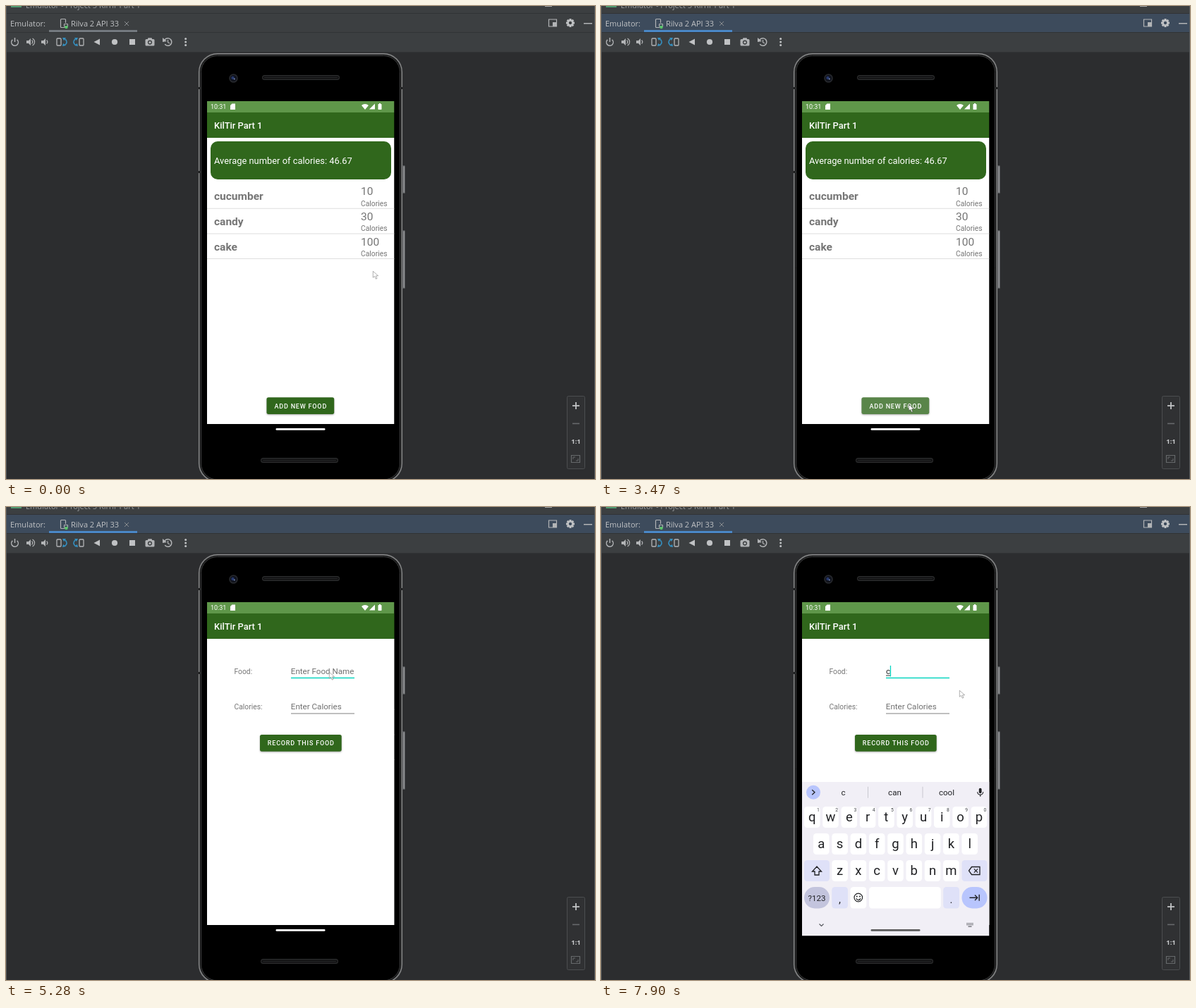
These frames come from a looping animation (835 px wide and 671 px high, 8 s). An HTML page with a canvas:

```html
<!DOCTYPE html>
<html lang="en">
<head>
<meta charset="utf-8">
<title>Calorie tracker demo</title>
<style>
html, body { margin: 0; width: 100%; height: 100%; overflow: hidden; background: #2c2d2f; }
canvas { display: block; width: 835px; height: 671px; }
</style>
</head>
<body>
<canvas id="stage" width="835" height="671"></canvas>
<script>
const W = 835, H = 671, LOOP = 8000;
const stage = document.getElementById('stage').getContext('2d');
const layer = document.createElement('canvas');
layer.width = W; layer.height = H;
const layerCtx = layer.getContext('2d');
let c = stage;

const GREEN = '#30671c', TEAL = '#08d5c0', GREY = '#757575', ICON = '#b2b4b6', INK = '#202124';
const UI = '"Open Sans", sans-serif', APP = 'Roboto, sans-serif';
const APP_NAME = 'KilTir Part 1';

function box(x, y, w, h, r, fill) {
  c.beginPath(); c.roundRect(x, y, w, h, r);
  c.fillStyle = fill; c.fill();
}
function frame(x, y, w, h, r, color, lw = 1) {
  c.beginPath(); c.roundRect(x, y, w, h, r);
  c.strokeStyle = color; c.lineWidth = lw; c.stroke();
}
function disc(x, y, r, fill) {
  c.beginPath(); c.arc(x, y, r, 0, 7); c.fillStyle = fill; c.fill();
}
function arc(x, y, r, a, b, color, lw) {
  c.beginPath(); c.arc(x, y, r, a, b); c.strokeStyle = color; c.lineWidth = lw; c.stroke();
}
function trace(x, y, pts) {
  c.beginPath();
  for (let i = 0; i < pts.length; i += 2) c.lineTo(x + pts[i], y + pts[i + 1]);
}
function line(x, y, pts, color, lw = 1) {
  trace(x, y, pts); c.strokeStyle = color; c.lineWidth = lw; c.stroke();
}
function poly(x, y, pts, fill) {
  trace(x, y, pts); c.closePath(); c.fillStyle = fill; c.fill();
}
function text(s, x, y, size, color, { weight = 400, font = APP, align = 'left', gap = 0 } = {}) {
  c.font = `${weight} ${size}px ${font}`;
  c.textAlign = align; c.letterSpacing = gap + 'px';
  c.fillStyle = color; c.fillText(s, x, y);
}
function gear(x, y, r, color, hole) {
  for (let i = 0; i < 8; i++) {
    c.save(); c.translate(x, y); c.rotate(i * Math.PI / 4);
    box(-r * .25, -r, r * .5, r, 0, color); c.restore();
  }
  disc(x, y, r * .76, color);
  disc(x, y, r * .36, hole);
}
// Number of steps already taken at time t, out of n evenly spread over [from, to].
function stepsDone(t, from, to, n) {
  return t < from ? 0 : Math.min(n, 1 + Math.floor((t - from) * (n - 1) / (to - from) + 1e-6));
}
const mix = (a, b, p) => a + (b - a) * p;
const easeOut = p => 1 - (1 - p) ** 2;
const smooth = p => p * p * (3 - 2 * p);

function ide(t) {
  c.fillStyle = '#2c2d2f'; c.fillRect(0, 0, W, H);
  c.fillStyle = '#3c3f41'; c.fillRect(0, 0, W, 65);
  const bar = t < 2650 ? '#3c3f41' : '#3d4b5c';
  c.fillStyle = bar; c.fillRect(1, 11, 833, 26);
  c.fillStyle = '#313335';
  c.fillRect(0, 10, W, 1); c.fillRect(0, 37, W, 1); c.fillRect(0, 65, W, 1);

  // Lower edge of the window title
  c.fillStyle = '#4f9a70'; c.fillRect(7, 0, 15, 2);
  text('Emulator - Project 5 KilTir Part 1', 28, 2.5, 11, '#999c9e', { font: UI });
  c.fillStyle = '#aaa'; c.fillRect(764, 0, 10, 1);

  text('Emulator:', 6, 29, 11, '#c0c2c4', { font: UI });
  frame(77.5, 18.5, 7, 12, 1, ICON, 1.2);
  box(81, 24, 7, 6, 0, bar);
  frame(82.5, 25.5, 5, 3.5, 0, ICON);
  disc(85.5, 30, 2.3, '#59c36a');
  text('Rilva 2 API 33', 92, 29, 11, '#c0c2c4', { font: UI });
  line(171, 25, [-3, -3, 3, 3], '#898d90');
  line(171, 25, [3, -3, -3, 3], '#898d90');
  box(61, 34, 125, 3, 0, t < 2650 ? '#747a80' : '#4a88c7');

  frame(769.5, 19, 11, 10, 0, ICON, 1.2);
  box(775, 23, 5, 6, 0, ICON);
  gear(800, 24, 6, '#c0c2c4', bar);
  box(819, 24, 12, 1.5, 0, ICON);
  toolbar();
  zoomPanel();
  c.fillStyle = '#56595b';
  c.fillRect(0, 0, 1, H); c.fillRect(834, 0, 1, H);
}

function toolbar() {
  const y = 51;
  arc(12.5, y + .5, 4.8, -.85, Math.PI + .85, ICON, 1.5);
  line(12.5, y, [0, -6, 0, 0], ICON, 1.5);
  for (const x of [34, 55]) {
    poly(x, y, [-5, -2, -2, -2, 1, -5, 1, 5, -2, 2, -5, 2], ICON);
    arc(x + 1, y, 2.8, -1, 1, ICON, 1.3);
  }
  arc(35, y, 5.6, -1.1, 1.1, ICON, 1.3);
  for (const s of [-1, 1]) {
    const x = s < 0 ? 75 : 107;
    frame(x - 3, y - 5, 6, 10, 1, ICON, 1.3);
    c.save(); c.translate(x - s * 8, y); c.scale(-s, 1);
    arc(-1.5, 0, 4.5, -1.1, 1.1, '#3592c4', 1.5);
    poly(0, 0, [-3, -6, 2, -6, -1, -2], '#3592c4');
    poly(0, 0, [-3, 6, 2, 5, -2, 2], '#3592c4');
    c.restore();
  }
  poly(129, y, [-4.5, 0, 4, -4.5, 4, 4.5], '#c0c2c4');
  disc(154, y, 4.1, '#c0c2c4');
  box(175, 47, 8, 8, 0, '#c0c2c4');
  box(197.5, 47, 13, 9.5, 1.5, ICON);
  box(201, 45.2, 6, 3, 1, ICON);
  disc(204, 51.6, 3.1, '#3c3f41'); disc(204, 51.6, 1.7, ICON);
  arc(229.5, y, 5.3, -2.9, 2.5, ICON, 1.5);
  poly(224, 49, [-2, -4, -2, 2, 4, 1], ICON);
  line(229.5, y, [0, -3, 0, .5, 2.5, 2], ICON, 1.2);
  for (const d of [-4.6, 0, 4.6]) disc(254.7, y + d, 1.5, '#c0c2c4');
}

function zoomPanel() {
  box(795, 553, 25, 104, 2, '#303133');
  frame(795.5, 553.5, 25, 103, 2, '#4c4e50');
  box(803, 566.2, 10, 1.8, 0, '#c0c2c4');
  box(807.1, 562, 1.8, 10, 0, '#c0c2c4');
  box(803, 591.6, 10, 1.6, 0, '#66696b');
  text('1:1', 808, 621, 9.5, '#c8cacc', { weight: 700, font: UI, align: 'center' });
  frame(801.5, 637.5, 12, 10, 0, '#66696b', 1.2);
  line(804, 640, [0, 3, 0, 0, 3, 0], '#66696b');
  line(811, 645, [0, -3, 0, 0, -3, 0], '#66696b');
}

function phone() {
  for (const [y, h] of [[226, 40], [318, 83]]) {
    box(561, y, 5, h, 1.5, '#55575a');
    box(563, y + 1, 2, h - 2, 1, '#8e9092');
  }
  box(272.5, 66.5, 290, 609.5, 27, '#3a3b3c');
  frame(273.7, 67.7, 287.6, 607, 26, '#858687', 1.4);
  box(275, 69, 285, 604.5, 25, '#0c0c0c');
  frame(276.5, 70.5, 282, 601.5, 23, '#3c3d3e');
  box(277.5, 71.5, 280, 599.5, 22, '#000');
  for (const y of [115, 234]) box(272.5, y, 3.5, 3, 0, '#202122');
  box(559, 115, 3.5, 3, 0, '#202122');
  disc(322.5, 102.5, 6.3, '#26282c');
  disc(322.5, 102.5, 4.6, '#10131d');
  disc(321.5, 102, 2.2, '#26386b');
  disc(323.8, 103.5, 1, '#8090b8');
  for (const [x, y] of [[363, 98], [361, 641]]) {
    box(x, y, 110, 7, 3.5, '#2d2e2f');
    box(x + 1, y + 1.3, 108, 4.5, 2.2, '#121213');
    box(x + 3, y + 3, 104, 1, .5, '#242526');
  }
  box(382.5, 599, 70, 2.8, 1.4, '#fff');
}

function button(x, y, w, label) {
  c.save();
  c.shadowColor = 'rgba(0,0,0,.35)'; c.shadowBlur = 2.5; c.shadowOffsetY = 1;
  box(x, y, w, 23.7, 2.6, GREEN);
  c.restore();
  text(label, x + w / 2 + .4, y + 15.3, 9.03, '#fff', { weight: 500, align: 'center', gap: .806 });
}

function pageBase(dx) {
  box(285, 187, 265.5, 406, 0, '#fff');
  box(285, 151, 265.5, 36, 0, GREEN);
  text(APP_NAME, 295 + dx, 173.6, 12.9, '#fff', { weight: 500 });
}

function listPage(dx, t) {
  pageBase(dx);
  box(290 + dx, 192, 256, 54, 10, GREEN);
  text('Average number of calories: 46.67', 295 + dx, 224, 12.9, '#fff');
  [['cucumber', 10], ['candy', 30], ['cake', 100]].forEach(([name, n], i) => {
    const y = i * 35.7;
    text(name, 295 + dx, 275.3 + y, 15.5, GREY, { weight: 700 });
    text(String(n), 503 + dx, 268.4 + y, 15.5, GREY);
    text('Calories', 503 + dx, 283.5 + y, 10.3, GREY);
    box(285, 286.7 + y, 265.5, 1, 0, '#dedede');
  });
  button(369.5 + dx, 555.2, 95.7, 'ADD NEW FOOD');
  const ripple = stepsDone(t, 3080, 3340, 3);
  if (ripple && t < 3590) {
    c.save();
    c.beginPath(); c.roundRect(369.5, 555.2, 95.7, 23.7, 2.6); c.clip();
    disc(436, 567, ripple * 28, 'rgba(255,255,255,.2)');
    c.restore();
  }
}

function formPage(dx, t) {
  pageBase(dx);
  const focus = t >= 5280, typed = t >= 7620;
  text('Food:', 323.5 + dx, 236.8, 10.3, GREY);
  text('Calories:', 323.5 + dx, 287, 10.3, GREY);
  if (typed) {
    text('c', 404 + dx, 237.2, 11.6, '#222');
    box(404, 238.6, 6, 1, 0, '#333');
  } else text('Enter Food Name', 403.8 + dx, 237.2, 11.6, '#707070');
  text('Enter Calories', 403.8 + dx, 287.4, 11.6, '#707070');
  box(404 + dx, focus ? 241.7 : 242.2, 90, focus ? 1.6 : 1, 0, focus ? TEAL : '#808080');
  box(404 + dx, 292.4, 90, 1, 0, '#808080');
  const caret = (t >= 5400 && t < 5860) || (t >= 6270 && t < 6810) || t >= 7480;
  if (caret) box(typed ? 409.8 : 404, 225, 1.3, 15.5, 0, TEAL);
  button(360 + dx, 323, 115.7, 'RECORD THIS FOOD');
}

function statusBar() {
  box(285, 135, 265.5, 16, 0, '#5f974a');
  text('10:31', 290, 146.2, 9, '#fff');
  poly(318, 138.5, [2.5, 0, 7, 0, 7, 8.5, 0, 8.5, 0, 2.5], '#fff');
  c.beginPath(); c.moveTo(509, 147); c.arc(509, 146, 7, -2.36, -.78); c.closePath();
  c.fillStyle = '#fff'; c.fill();
  poly(515, 138.5, [8, 0, 8, 8, 0, 8], '#fff');
  box(527.5, 139, 5, 8, .8, '#fff');
  box(529, 138, 2, 2, 0, '#fff');
}

function mic(x, y) {
  box(x - 1.9, y - 6, 3.8, 7.5, 1.9, INK);
  arc(x, y - .5, 4, 0, Math.PI, INK, 1.2);
  line(x, y, [0, 3.5, 0, 6], INK, 1.2);
}

function toolStrip(y) {
  line(301, y, [2, -3.5, -1.8, 0, 2, 3.5], INK, 1.3);
  frame(331.5, y - 5, 9.5, 10, 1.5, INK, 1.3);
  poly(338, y + 2, [0, 4, 0, 0, 4, 0], INK);
  disc(334.5, y - 1.5, .8, INK); disc(338.2, y - 1.5, .8, INK);
  arc(336.3, y, 2.4, .3, 2.8, INK, 1);
  text('GIF', 374.5, y + 3.4, 9, INK, { weight: 900, align: 'center', gap: .3 });
  frame(408.5, y - 4.5, 9, 10, 1, INK, 1.3);
  box(411, y - 6, 4, 3, 1, INK);
  for (const d of [-1, 1, 3]) box(410.5, y + d - .3, d > 2 ? 3.5 : 5, 1, 0, INK);
  gear(451.5, y, 6, '#303236', '#f1eff6');
  box(474.8, y - 7, 1, 14, 0, '#c9c8cf');
  for (const d of [-4, 0, 4]) disc(498.3 + d, y, 1.2, INK);
}

function suggestions(y) {
  line(301, y, [-1.8, -3.5, 2, 0, -1.8, 3.5], INK, 1.3);
  [['c', 343.5], ['can', 416.5], ['cool', 490]].forEach(([s, x]) =>
    text(s, x, y + 4, 11.6, INK, { align: 'center' }));
  for (const x of [378, 455.5]) box(x, y - 8, 1, 16, 0, '#c9c8cf');
}

function keyRow(letters, x0, y, digits) {
  [...letters].forEach((s, i) => {
    const x = x0 + i * 26.3;
    box(x - 11.3, y - 15, 22.6, 30, 4.5, '#fff');
    text(s, x, y + 6, 18.5, INK, { align: 'center' });
    if (digits) text(String((i + 1) % 10), x + 8.6, y - 7.8, 6.8, '#44464c', { align: 'center' });
  });
}

function keyboard(t) {
  if (t < 5860) return;
  const dy = t < 6000 ? 14.5 : 0;
  const LAV = '#dfe1f8', BLUE = '#b8c5fd';
  c.save();
  c.beginPath(); c.rect(285, 380, 265.5, 228.3); c.clip();
  c.translate(0, dy);
  box(285, 390, 265.5, 230, 0, '#f1eff6');
  disc(301, 404.7, 10, BLUE);
  const swap = Math.min(1, stepsDone(t, 7760, 7900, 2) / 2);
  if (swap < 1) { c.globalAlpha = 1 - swap; toolStrip(404.7); }
  if (swap > 0) { c.globalAlpha = swap; suggestions(404.7); }
  c.globalAlpha = 1;
  mic(537.7, 404.7);
  keyRow('qwertyuiop', 299.2, 440, true);
  keyRow('asdfghjkl', 312.3, 478);
  keyRow('zxcvbnm', 338.6, 516);

  box(288, 501, 36, 30, 4.5, LAV);
  line(306, 516, [-3, 6, -3, 1, -6.5, 1, 0, -6, 6.5, 1, 3, 1, 3, 6, -3, 6, -3, 1], INK, 1.3);
  box(511.5, 501, 36, 30, 4.5, LAV);
  line(529.5, 516, [-8, 0, -4, -5.5, 7.5, -5.5, 7.5, 5.5, -4, 5.5, -8, 0, -4, -5.5], INK, 1.3);
  line(531.5, 516, [-2.6, -2.6, 2.6, 2.6], INK, 1.3);
  line(531.5, 516, [2.6, -2.6, -2.6, 2.6], INK, 1.3);

  box(288, 539, 36, 30.5, 15, '#c3c4dd');
  text('?123', 306, 558.5, 11.5, INK, { align: 'center' });
  box(327.2, 539, 22.8, 30.5, 4.5, LAV);
  text(',', 338.6, 562, 15, INK, { align: 'center' });
  box(353.5, 539, 22.8, 30.5, 4.5, '#fff');
  arc(364.8, 554, 5.8, 0, 7, INK, 1.2);
  disc(362.7, 552.5, 1, INK); disc(367, 552.5, 1, INK);
  arc(364.8, 554.5, 3, .2, 2.94, INK, 1.2);
  box(380, 539, 101.8, 30.5, 4.5, '#fff');
  box(485.2, 539, 22.8, 30.5, 4.5, LAV);
  text('.', 496.6, 562, 15, INK, { align: 'center' });
  box(511.5, 539, 36, 30.5, 15, BLUE);
  line(529.5, 554.2, [-7, 0, 4, 0], INK, 1.4);
  line(529.5, 554.2, [.5, -3.7, 4.2, 0, .5, 3.7], INK, 1.4);
  line(529.5, 554.2, [6.7, -4.5, 6.7, 4.5], INK, 1.4);

  line(312.5, 593, [-3, -1.5, 0, 1.5, 3, -1.5], '#505258', 1.1);
  for (let i = 0; i < 10; i++) box(518.3 + (i % 5) * 2, 590 + (i / 5 | 0) * 2, 1.3, 1.3, 0, '#606268');
  box(520.5, 594.5, 5, 1.2, 0, '#606268');
  c.translate(0, -dy);
  const dark = stepsDone(t, 6810, 6960, 2) / 2;
  const v = Math.round(mix(255, 92, dark));
  box(382.5, 599, 70, 2.8, 1.4, `rgb(${v},${v},${v})`);
  c.restore();
}

function screen(t) {
  c.save();
  c.beginPath(); c.rect(285, 135, 265.5, 458); c.clip();
  if (t < 3590) listPage(0, t);
  else {
    const p = t < 3710 ? .79 : t < 3860 ? .95 : 1;
    listPage(-26.6 * p, t);
    c = layerCtx;
    c.clearRect(0, 0, W, H);
    formPage(26.6 * (1 - p), t);
    c = stage;
    c.globalAlpha = t < 3710 ? .8 : 1;
    c.drawImage(layer, 0, 0);
    c.globalAlpha = 1;
  }
  statusBar();
  c.restore();
  keyboard(t);
}

function pointerAt(t) {
  if (t < 4140) {
    const p = smooth(stepsDone(t, 120, 1020, 7) / 7);
    return [mix(520, 436, p), mix(376, 565, p)];
  }
  if (t < 5860) {
    const n = stepsDone(t, 4140, 5160, 9);
    if (n <= 3) return [436, mix(565, 317, smooth(n / 3))];
    const p = easeOut((n - 3) / 6);
    return [mix(436, 458, p), mix(317, 234, p)];
  }
  const p = smooth((stepsDone(t, 5860, 6540, 6) - 1) / 5);
  return [mix(458, 508, p), mix(234, 260, p)];
}

function pointer(t) {
  const [x, y] = pointerAt(t);
  const solid = t >= 2120 && t < 3590;
  trace(x, y, [.3, .3, .3, 9.2, 2.6, 7.4, 4.3, 11.2, 6, 10.4, 4.4, 6.9, 7.6, 6.7]);
  c.closePath();
  c.fillStyle = '#fff'; c.fill();
  c.strokeStyle = solid ? 'rgba(20,30,15,.65)' : 'rgba(80,80,80,.65)';
  c.lineWidth = .7; c.stroke();
}

function draw(now) {
  const t = now % LOOP;
  ide(t);
  phone();
  screen(t);
  pointer(t);
}

const start = performance.now();
function tick() {
  draw(performance.now() - start);
  requestAnimationFrame(tick);
}
tick();
</script>
</body>
</html>
```
